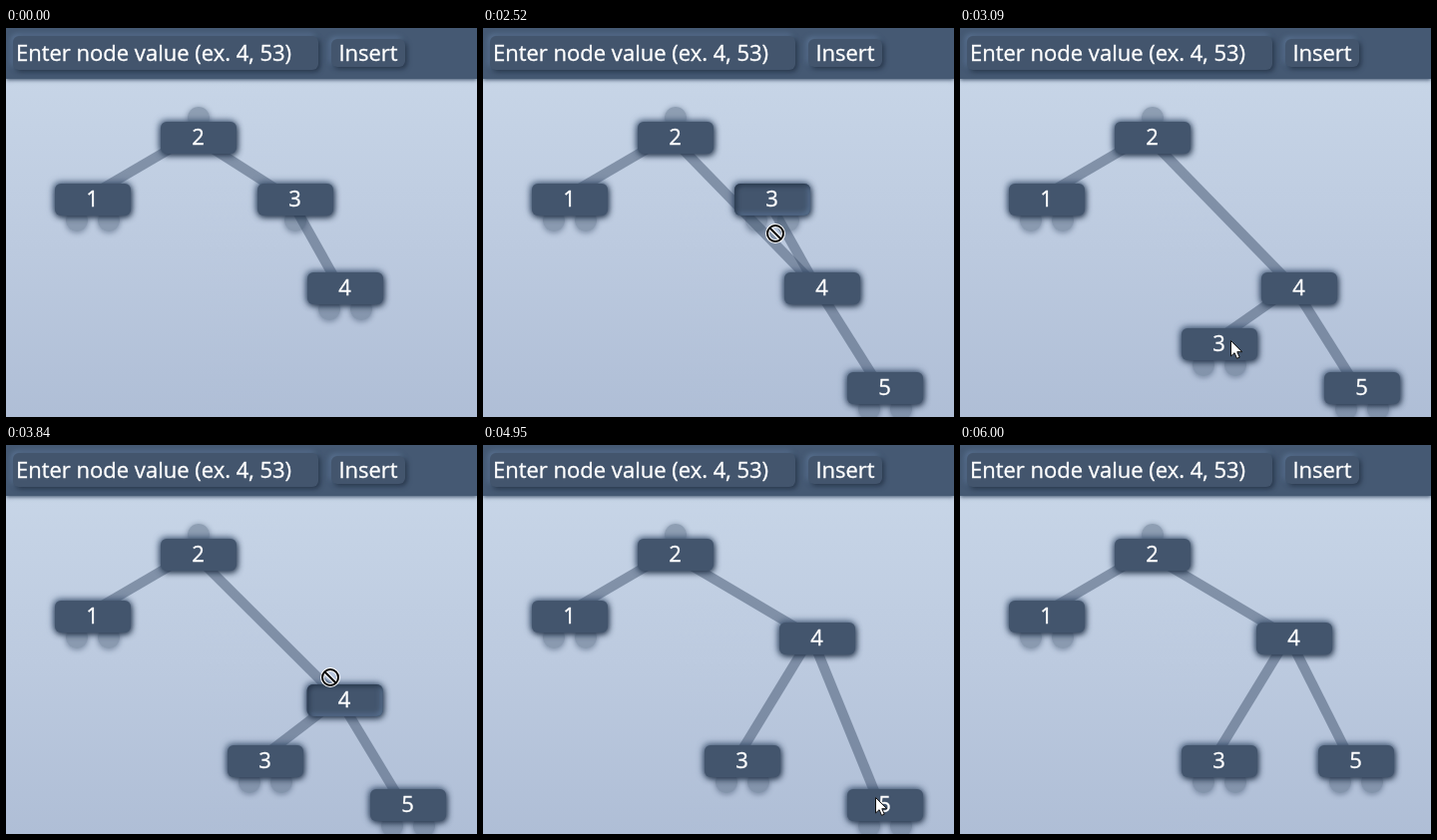
Recreate the animation shown at these times as an HTML page. Size 472x390 px, loop 6.75 s.

```html
<!DOCTYPE html>
<html lang="en">
<head>
<meta charset="utf-8">
<title>Tree builder</title>
<style>
  :root {
    --slate: #43556d; --dark: #27364a; --light: #5c7595;
    --inset: inset 2px 2px 5px var(--dark), inset -2px -2px 5px var(--light);
    --halo: 1px 2px 6px rgba(30, 44, 64, .9), -1px -1px 6px 1px rgba(66, 90, 122, .75);
  }
  html, body { margin: 0; width: 100%; height: 100%; overflow: hidden; }
  #stage {
    position: relative; width: 472px; height: 390px; overflow: hidden;
    background: linear-gradient(#c7d5e7 50px, #bccadf 220px, #afbed6);
    font: 22px/32px "Open Sans", "Noto Sans", sans-serif; color: #fff;
    -webkit-text-stroke: .35px #fff;
  }
  #stage > *, .node i { position: absolute; box-sizing: border-box; }
  #bar { left: 0; top: 0; width: 472px; height: 51px; background: #455973; box-shadow: 0 1px 4px #3d5069; }
  .box {
    background: var(--slate); border-radius: 6px; white-space: pre;
    box-shadow: 2px 2px 5px var(--dark), -2px -2px 5px var(--light);
  }
  #field { left: 7px; top: 8px; width: 306px; height: 34px; padding-left: 3px; line-height: 32px; }
  #caret { top: 13px; width: 1px; height: 24px; background: #fff; }
  #button { left: 326px; top: 11px; width: 74px; height: 28px; line-height: 26px; text-align: center; }
  .node { left: -38px; top: -16px; width: 76px; height: 32px; }
  .node b {
    position: absolute; inset: 0; padding-right: 1px; text-align: center;
    font-weight: 400; line-height: 29px; box-shadow: var(--halo);
  }
  .node i {
    width: 22px; height: 22px; margin-left: -11px; top: 26px; border-radius: 50%;
    background: rgba(66, 85, 110, .42); box-shadow: 0 1px 5px 1px rgba(66, 85, 110, .45);
  }
  .node i.top { top: -15px; left: 38px; }
  #button.down { box-shadow: var(--inset); }
  .node.down b { box-shadow: var(--inset), var(--halo); }
  svg { left: 0; top: 0; width: 472px; height: 390px; overflow: hidden; }
  #links { stroke: rgba(66, 85, 110, .5); stroke-width: 10; }
</style>
</head>
<body>
<div id="stage">
  <svg id="links"><g transform="translate(-6 -2)"></g></svg>
  <div id="bar"></div>
  <div id="field" class="box"></div>
  <div id="caret"></div>
  <div id="button" class="box">Insert</div>
  <svg id="pointer" fill="none">
    <path id="arrow" d="M.5 .5V16l3.6-3.3 2.4 5.6 2.7-1.1-2.4-5.5h5Z" fill="#fff" stroke="#111" stroke-linejoin="round"/>
    <path id="beam" d="M-3-8h2.5l.5 1 .5-1H3M-3 8h2.5L0 7l.5 1H3M0-7V7" stroke="#111" stroke-width="1.5"/>
    <g id="nodrop">
      <g stroke="#fff" stroke-width="4"><circle r="8"/><path d="M-5.5-5.5 5.5 5.5"/></g>
      <g stroke="#000" stroke-width="2"><circle r="8"/><path d="M-5.5-5.5 5.5 5.5"/></g>
    </g>
  </svg>
</div>
<script>
const LOOP = 6750, STEP = 30;
const ENTER = 180, FOCUS = 540, TYPED = 840, BLINK = 1340, CLICK = 1500, INSERTED = 1560, LEAVE = 6000;
const LAG = 1 / 3; // share of a drag before the node starts to follow

const homes = { 1: [87, 172], 2: [193, 110], 3: [290, 172], 4: [340, 261], 5: [403, 361] };
const drags = [
  { id: 3, leave: 1770, start: 2250, end: 3060, to: [260, 317], grip: [11, -4] },
  { id: 4, leave: 3120, start: 3480, end: 4290, to: [335, 194], grip: [-13, 0] },
  { id: 5, leave: 4590, start: 5040, end: 5540, to: [397, 317], grip: [-2, 10] }
];
const linksBefore = [[2, 1], [2, 3], [3, 4]];
const linksAfter = [[2, 1], [2, 4], [4, 3], [4, 5]];

const $ = id => document.getElementById(id);
const within = (t, from, to) => t >= from && t < to;
const add = (a, b) => a.map((v, i) => v + b[i]);
const mix = (a, b, p) => a.map((v, i) => v + (b[i] - v) * p);
const show = (el, on) => { el.style.display = on ? "" : "none"; };

function ease(t, from, to) {
  const p = Math.min(1, Math.max(0, (t - from) / (to - from)));
  return p * p * (3 - 2 * p);
}

// The pointer goes from place to place; each drag is a reach and a pull.
const moves = [
  { from: ENTER, until: 510, to: [230, 25] },
  { from: TYPED + STEP, until: 1320, to: [363, 29] },
  ...drags.flatMap(d => [
    { from: d.leave, until: d.start, to: add(homes[d.id], d.grip) },
    { from: d.start, until: d.end, to: add(d.to, d.grip) }
  ]),
  { from: 5610, until: LEAVE + STEP, to: [470, 172] }
];

const cursorAt = t => moves.reduce((at, m) => mix(at, m.to, ease(t, m.from, m.until)), [414, 3]);
const dragOf = id => drags.find(d => d.id === id);
const held = (d, t) => within(t, d.start, d.end + STEP);

function nodeAt(id, t) {
  const d = dragOf(id);
  return d ? mix(homes[id], d.to, ease(t, d.start + (d.end - d.start) * LAG, d.end)) : homes[id];
}

const nodes = Object.keys(homes).map(Number).map(id => {
  const el = document.createElement("div");
  el.className = "node";
  el.innerHTML = `<i></i><i></i>${id === 2 ? '<i class="top"></i>' : ""}<b class="box">${id}</b>`;
  $("stage").insertBefore(el, $("bar"));
  return { id, el, slots: el.querySelectorAll("i:not(.top)") };
});

function drawTree(t) {
  const links = t < INSERTED ? linksBefore : linksAfter;
  for (const { id, el, slots } of nodes) {
    const [x, y] = nodeAt(id, t), drag = dragOf(id);
    el.style.transform = `translate(${x}px, ${y}px)`;
    el.classList.toggle("down", !!drag && held(drag, t));
    show(el, id !== 5 || t >= INSERTED);
    const free = 2 - links.filter(l => l[0] === id).length;
    slots.forEach((slot, i) => {
      show(slot, i < free);
      slot.style.left = 38 + (free === 2 ? i * 32 - 16 : 0) + "px";
    });
  }
  $("links").firstChild.innerHTML = links.map(([a, b]) =>
    `<path d="M${nodeAt(a, t)}L${nodeAt(b, t)}"/>`).join("");
}

function drawForm(t) {
  const typed = within(t, TYPED, INSERTED);
  $("field").textContent = typed ? "5" : "Enter node value (ex. 4, 53)";
  show($("caret"), within(t, FOCUS, BLINK));
  $("caret").style.left = (typed ? 23 : 10) + "px";
  $("button").classList.toggle("down", within(t, CLICK, INSERTED + STEP));
}

function drawCursor(t) {
  const [x, y] = cursorAt(t).map(Math.round);
  const dragging = drags.some(d => held(d, t) && t >= d.start + 90);
  const inField = y < 42 && x < 313;
  const shape = dragging ? "nodrop" : inField ? "beam" : "arrow";
  for (const el of $("pointer").children) show(el, el.id === shape);
  $(shape).setAttribute("transform", `translate(${x} ${y})`);
  show($("pointer"), within(t, ENTER, LEAVE));
}

function frame() {
  const t = Math.floor((performance.now() % LOOP) / STEP) * STEP;
  drawTree(t);
  drawForm(t);
  drawCursor(t);
  requestAnimationFrame(frame);
}

frame();
</script>
</body>
</html>
```
